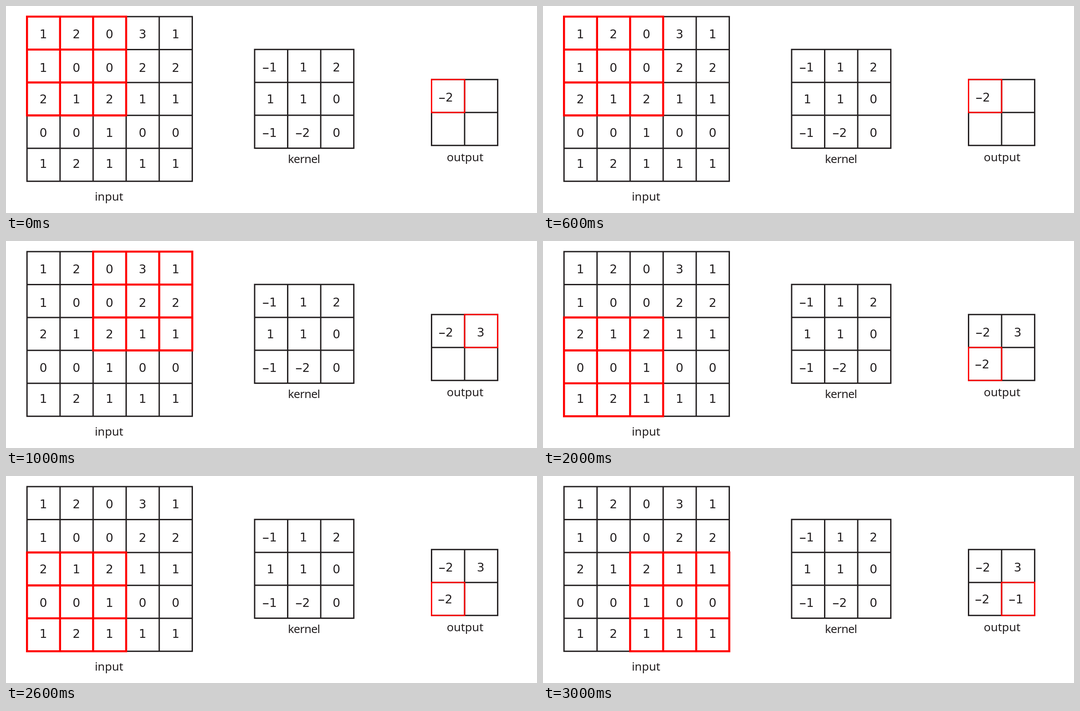
These frames come from a looping animation (1196x468 px, 4000 ms). An HTML page:

```html
<!DOCTYPE html>
<html lang="en">
<head>
<meta charset="utf-8">
<title>Strided convolution</title>
<style>
  html, body { margin: 0; width: 100%; height: 100%; overflow: hidden; background: #fff; }
  svg { display: block; width: 100%; height: 100%; }
  text { fill: #231f20; text-anchor: middle; }
  .digit { font: 27px "DejaVu Sans", sans-serif; }
  .minus { font: 30px "Noto Sans", sans-serif; }
  .label { font: 26px "Noto Sans", "Open Sans", sans-serif; }
  path { fill: none; stroke-linecap: square; }
</style>
</head>
<body>
<svg id="stage" viewBox="0 0 1196 468"></svg>
<script>
const CELL = 74.45;
const STEP_MS = 1000;
const INK = "#231f20";
const RED = "#ff0000";
const INPUT = { x: 47.3, y: 24 };
const OUTPUT = { x: 958.5, y: 166.3 };
const stage = document.getElementById("stage");

function add(tag, attrs, text = "") {
  const el = document.createElementNS("http://www.w3.org/2000/svg", tag);
  for (const key in attrs) el.setAttribute(key, attrs[key]);
  el.textContent = text;
  return stage.appendChild(el);
}

function grid(x, y, n, stroke, width) {
  const size = n * CELL;
  let d = "";
  for (let i = 0; i <= n; i++) {
    const k = i * CELL;
    d += `M${x} ${y + k}h${size}M${x + k} ${y}v${size}`;
  }
  return add("path", { d, stroke, "stroke-width": width });
}

// Returns the text nodes so that a value can be shown or hidden.
function number(value, x, y) {
  const nodes = [add("text", { x, y: y + 10, class: "digit" }, Math.abs(value))];
  if (value < 0) nodes.push(add("text", { x: x - 16.5, y: y + 11, class: "minus" }, "–"));
  return nodes;
}

function numbers(rows, x, ys) {
  rows.forEach((row, r) => row.forEach((value, c) => {
    number(value, x + c * CELL + (value < 0 ? 6 : 0), ys[r]);
  }));
}

function label(text, x, y, spacing = 0) {
  add("text", { x, y, class: "label", "letter-spacing": spacing }, text);
}

grid(INPUT.x, INPUT.y, 5, INK, 3);
grid(560, 98.2, 3, INK, 3);
grid(OUTPUT.x, OUTPUT.y, 2, INK, 3);

const windowBox = grid(0, 0, 3, RED, 4.6);
const resultBox = grid(0, 0, 1, RED, 3);

numbers([
  [1, 2, 0, 3, 1],
  [1, 0, 0, 2, 2],
  [2, 1, 2, 1, 1],
  [0, 0, 1, 0, 0],
  [1, 2, 1, 1, 1]
], 84.2, [63, 138.5, 210, 286, 355.5]);

numbers([
  [-1, 1, 2],
  [1, 1, 0],
  [-1, -2, 0]
], 595.5, [138, 210, 286]);

const results = [
  number(-2, 998.5, 205.5),
  number(3, 1069, 205.5),
  number(-2, 997, 278),
  number(-1, 1073, 278)
];

label("input", 232, 440);
label("kernel", 671, 355, -0.8);
label("output", 1034, 351);

function draw(time) {
  const step = Math.floor(time / STEP_MS) % 4;
  const col = step % 2;
  const row = step >> 1;
  const place = (box, origin, stride) => box.setAttribute("transform",
    `translate(${origin.x + col * stride * CELL} ${origin.y + row * stride * CELL})`);
  place(windowBox, INPUT, 2);
  place(resultBox, OUTPUT, 1);
  results.forEach((nodes, i) => nodes.forEach(node =>
    node.setAttribute("visibility", i <= step ? "visible" : "hidden")));
}

const start = performance.now();
function tick() {
  draw(performance.now() - start);
  requestAnimationFrame(tick);
}
tick();
</script>
</body>
</html>
```
